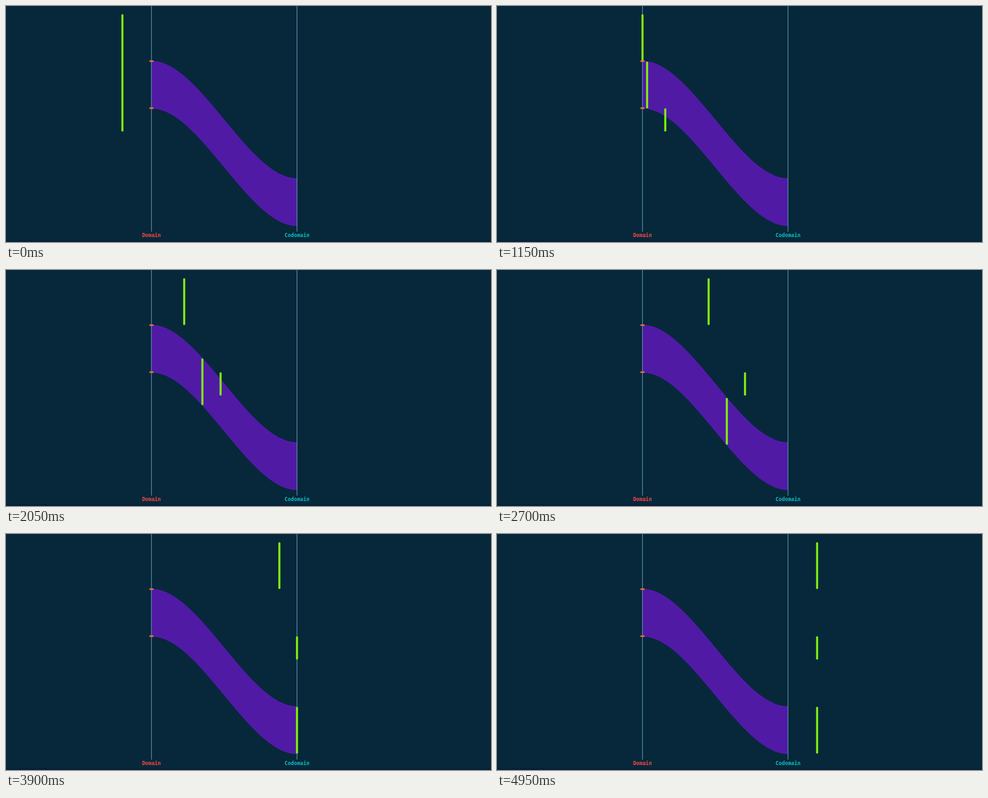
Write an HTML page that moves like this. It is 1074 px wide and 522 px high and loops after 5000 ms.

```html
<!DOCTYPE html>
<html lang="en">
<head>
<meta charset="utf-8">
<title>Domain to codomain</title>
<style>
  html, body { margin: 0; width: 100%; height: 100%; overflow: hidden; background: #07283a; }
  svg { display: block; width: 1074px; height: 522px; }
  text { font: bold 11.5px "DejaVu Sans Mono", monospace; text-anchor: middle; }
  .axis { stroke: #5c90b4; stroke-width: 1.5; }
  .tick { stroke: #e2703a; stroke-width: 3.6; stroke-linecap: round; }
  .ribbon { fill: #501aa5; stroke: #6f14e0; stroke-width: 1; }
  .bar { fill: #7fee11; }
</style>
</head>
<body>
<svg viewBox="0 0 1074 522">
  <rect y="518" width="1074" height="4" fill="#06213a"/>
  <path class="ribbon" id="ribbon"/>
  <path class="axis" d="M322.2 0V499M644.4 0V499"/>
  <g id="bars"></g>
  <path class="tick" d="M319 122H325.4M319 226H325.4"/>
  <text x="322.2" y="511" fill="#fb4545">Domain</text>
  <text x="644.4" y="511" fill="#10bcc0">Codomain</text>
</svg>
<script>
const LOOP = 5000, STEP = 50, LAST = 99;
const START = 257.76, DOMAIN = 322.2, CODOMAIN = 644.4, END = 708.84;
const SPAN = CODOMAIN - DOMAIN, DROP = 260;
const ENTER = 1 / 7, LEAVE = 6 / 7, CROSS = 4 / 7;

const clamp = v => Math.min(1, Math.max(0, v));
const lerp = (a, b, v) => a + (b - a) * v;
const smooth = v => v * v * (3 - 2 * v);

// Ribbon: smoothstep edges, exact as cubic Beziers with thirds as handles
const third = SPAN / 3;
document.getElementById('ribbon').setAttribute('d',
  `M${DOMAIN} 122c${third} 0 ${2 * third} ${DROP} ${SPAN} ${DROP}v104` +
  `c${-third} 0 ${-2 * third} ${-DROP} ${-SPAN} ${-DROP}z`);

function addBar(y, height) {
  const bar = document.createElementNS('http://www.w3.org/2000/svg', 'rect');
  const attrs = { class: 'bar', x: -2.3, y: y + 0.3, width: 4.6, height: height - 0.5, rx: 2.1 };
  for (const name in attrs) bar.setAttribute(name, attrs[name]);
  document.getElementById('bars').append(bar);
  return bar;
}

const whole = addBar(18, 260);
const pieces = [
  { y: 18, height: 104, delay: 2 / 7, drop: 0 },
  { y: 122, height: 104, delay: 3 / 14, drop: DROP },
  { y: 226, height: 52, delay: 1 / 7, drop: 0 }
].map(p => ({ ...p, bar: addBar(p.y, p.height) }));

function place(bar, x, y, shown) {
  bar.setAttribute('transform', `translate(${x} ${y})`);
  bar.setAttribute('visibility', shown ? 'visible' : 'hidden');
}

function draw(ms) {
  const u = Math.floor((ms % LOOP) / STEP) / LAST;
  const split = u > ENTER;
  place(whole, lerp(START, DOMAIN, clamp(u / ENTER)), 0, !split);
  const exit = (END - CODOMAIN) * clamp((u - LEAVE) / (1 - LEAVE));
  for (const p of pieces) {
    const s = clamp((u - p.delay) / CROSS);
    place(p.bar, DOMAIN + SPAN * s + exit, p.drop * smooth(s), split);
  }
}

const begin = performance.now();
function tick() {
  draw(performance.now() - begin);
  requestAnimationFrame(tick);
}
draw(0);
requestAnimationFrame(tick);
</script>
</body>
</html>
```
